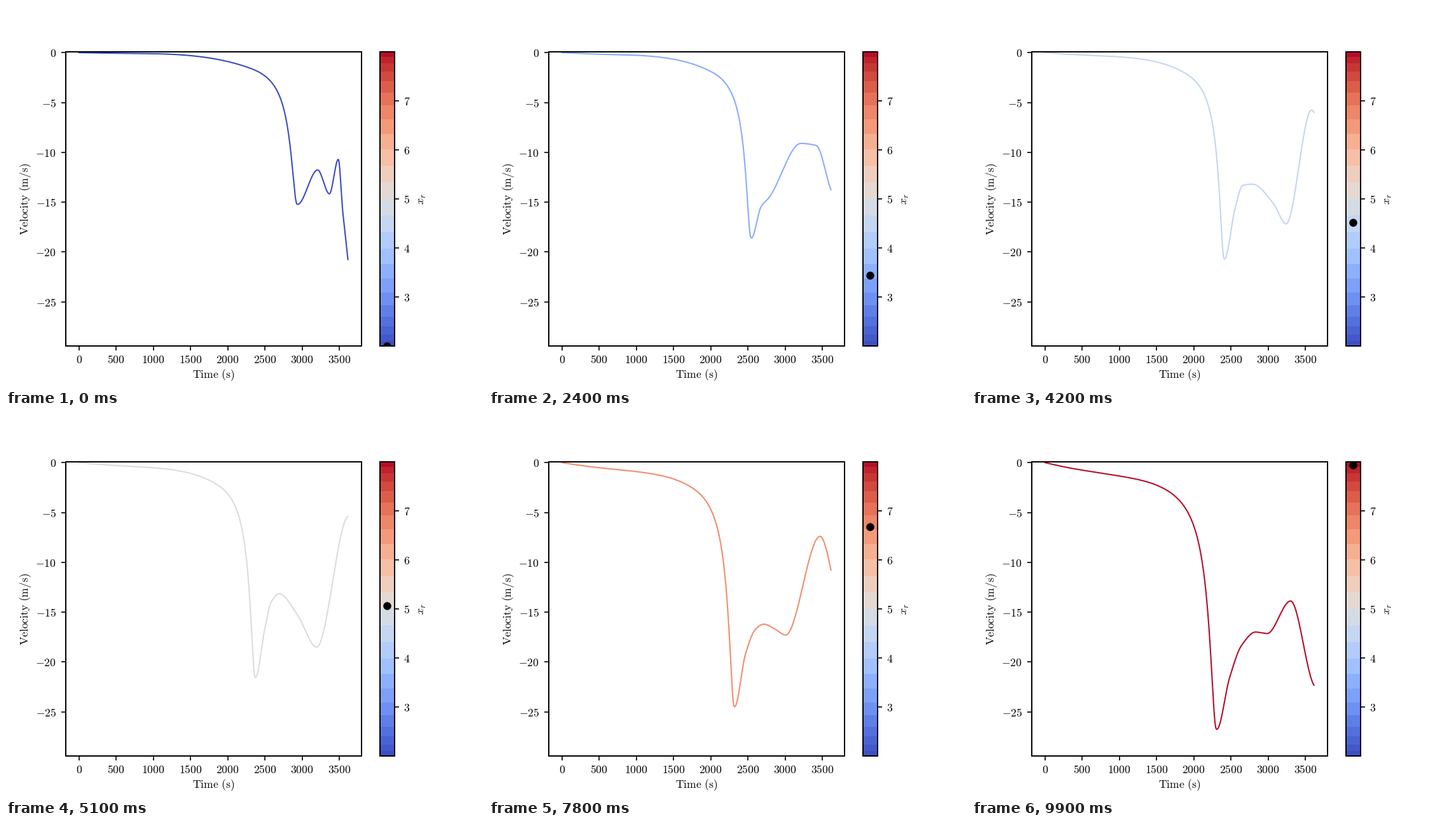
A matplotlib script for the animation above (10 s loop, 750 px wide and 600 px high).

```python
import numpy as np
import matplotlib.pyplot as plt
from matplotlib.animation import FuncAnimation

plt.rcParams.update({
    "mathtext.fontset": "cm",
    "font.size": 8.5,
    "axes.linewidth": 0.96,
    "xtick.major.pad": 2.9,
})

FRAMES = 100
XR_MIN, XR_MAX = 2.0, 8.0
T_END = 3615.0
V_TOP, V_BOTTOM = 0.08, -29.43
LEFT, WIDTH, TOP, HEIGHT = 93.75, 465.0, 72.0, 462.0
PX_PER_S = WIDTH / (1.1 * T_END)
PX_PER_V = HEIGHT / (V_TOP - V_BOTTOM)
X0, X_END = LEFT + WIDTH / 22, LEFT + WIDTH * 21 / 22
Y0 = TOP + V_TOP * PX_PER_V

# Stage positions of the first dip and the bends after it, by sweep step.
# Bends past X_END are cut off until they drift into view.
BENDS = {
    0: [(458.5, 311.5), (490, 257.5), (508.5, 295), (522.5, 241),
        (530, 328), (552, 480), (595, 300)],
    14: [(427.5, 341.5), (443.5, 312), (456, 315), (516, 178),
         (530, 187.5), (572, 325), (605, 200)],
    33: [(403.7, 383), (421, 310), (435, 283), (462, 265),
         (494, 283), (509.7, 314), (541, 169)],
    51: [(392.3, 410.5), (407, 334), (417, 292), (429.5, 279),
         (458, 312), (488.5, 363), (538.5, 158)],
    78: [(386.3, 456.5), (403, 375), (419, 335), (432, 327),
         (450, 335), (466.5, 344), (520.5, 189)],
    99: [(385, 492), (405, 411), (424, 360), (446, 339.3),
         (455, 340.5), (464, 341.7), (501, 290.5)],
}
STEPS = np.array(list(BENDS), float)
POSES = np.array(list(BENDS.values())).reshape(len(STEPS), -1)


def spline(xs, ys, x):
    """Natural cubic spline through the rows of ys."""
    n, h = len(xs), np.diff(xs)
    slope = np.diff(ys, axis=0) / h[:, None]
    a = np.eye(n)
    rhs = np.zeros(ys.shape)
    for k in range(1, n - 1):
        a[k, k - 1:k + 2] = h[k - 1], 2 * (h[k - 1] + h[k]), h[k]
        rhs[k] = 6 * (slope[k] - slope[k - 1])
    m = np.linalg.solve(a, rhs)
    k = np.clip(np.searchsorted(xs, x) - 1, 0, n - 2)
    d, hk = (x - xs[k])[:, None], h[k][:, None]
    b = slope[k] - hk * (2 * m[k] + m[k + 1]) / 6
    return ys[k] + d * (b + d * (m[k] / 2 + d * (m[k + 1] - m[k]) / (6 * hk)))


def ease_through(xs, ys, x):
    """Monotone cubic pieces, level at every crest and trough."""
    h = np.diff(xs)
    s = np.diff(ys) / h
    m = np.zeros(len(xs))
    for k in range(1, len(s)):
        if s[k - 1] * s[k] > 0:
            m[k] = 2 * s[k - 1] * s[k] / (s[k - 1] + s[k])
    k = np.clip(np.searchsorted(xs, x) - 1, 0, len(h) - 1)
    u = (x - xs[k]) / h[k]
    return (ys[k] + (ys[k + 1] - ys[k]) * u * u * (3 - 2 * u)
            + h[k] * u * (1 - u) * (m[k] * (1 - u) - m[k + 1] * u))


def approach(i, dip):
    """Slow creep that turns into a steep plunge down to the dip."""
    u = np.array([0, 0.25, 0.52, 1])
    sag = 1.8 + 0.11 * i + 1e-5 * i ** 3
    creep = np.column_stack([X0 + 125 * u, Y0 + sag * u ** 0.85])

    r = np.append(np.geomspace(9, 0.001, 40), 0)
    width = 0.98 + 0.28 * ((i - 46) / 50) ** 2
    plunge = np.column_stack([
        dip[0] - width * (5.14 * r + 7.65 * r ** 0.35),
        Y0 + (dip[1] - Y0) / (1 + r),
    ])
    knots = np.vstack([creep, plunge])
    s = np.append(0, np.cumsum(np.hypot(*np.diff(knots, axis=0).T)))
    return spline(s, knots, np.linspace(0, s[-1], 1000))


def velocity_curve(i):
    bends = spline(STEPS, POSES, np.array([float(i)])).reshape(-1, 2)
    bends = np.vstack([bends, bends[-1] + (40, 135)])
    x = np.linspace(bends[0, 0], X_END, 500)
    rebound = np.column_stack([x, ease_through(*bends.T, x)])
    x, y = np.vstack([approach(i, bends[0]), rebound]).T
    return (x - X0) / PX_PER_S, (Y0 - y) / PX_PER_V


def roman(text):
    return r"$\mathrm{%s}$" % text.replace(" ", r"\ ")


def number(value, _):
    return f"${value:g}$"


fig = plt.figure(figsize=(5, 4), dpi=150, facecolor="white")
ax = fig.add_axes([0.125, 0.11, 0.62, 0.77])
ax.set_xlim(-T_END / 20, T_END * 1.05)
ax.set_ylim(V_BOTTOM, V_TOP)
ax.set_xticks(range(0, 3501, 500))
ax.set_yticks(range(-25, 1, 5))
ax.set_xlabel(roman("Time (s)"), labelpad=1.4)
ax.set_ylabel(roman("Velocity (m/s)"), labelpad=2)

# Colour bands, widest in the middle of the scale
cax = fig.add_axes([587.81 / 750, 0.11, 23.1 / 750, 0.77])
edges = 5 + 3 * np.sin(np.linspace(-1.335, 1.335, 25)) / np.sin(1.335)
mids = (edges[1:] + edges[:-1]) / 2
cax.pcolormesh([0, 1], edges, mids[:, None], cmap="coolwarm",
               vmin=XR_MIN, vmax=XR_MAX)
cax.set_xlim(0, 1)
cax.set_ylim(XR_MIN, XR_MAX)
cax.set_xticks([])
cax.set_yticks(range(3, 8))
cax.yaxis.tick_right()
cax.yaxis.set_label_position("right")
cax.set_ylabel("$x_r$")

for axis in (ax.xaxis, ax.yaxis, cax.yaxis):
    axis.set_major_formatter(number)

cmap = plt.get_cmap("coolwarm")
line, = ax.plot([], [], lw=1)
dot, = cax.plot([], [], "o", color="black", ms=6, mew=0)


def update(i):
    line.set_data(*velocity_curve(i))
    line.set_color(cmap(i / FRAMES))
    dot.set_data([0.5], [XR_MIN + (XR_MAX - XR_MIN) * i / FRAMES])
    return line, dot


anim = FuncAnimation(fig, update, frames=FRAMES, interval=100, repeat=True,
                     repeat_delay=0)
plt.show()
```
